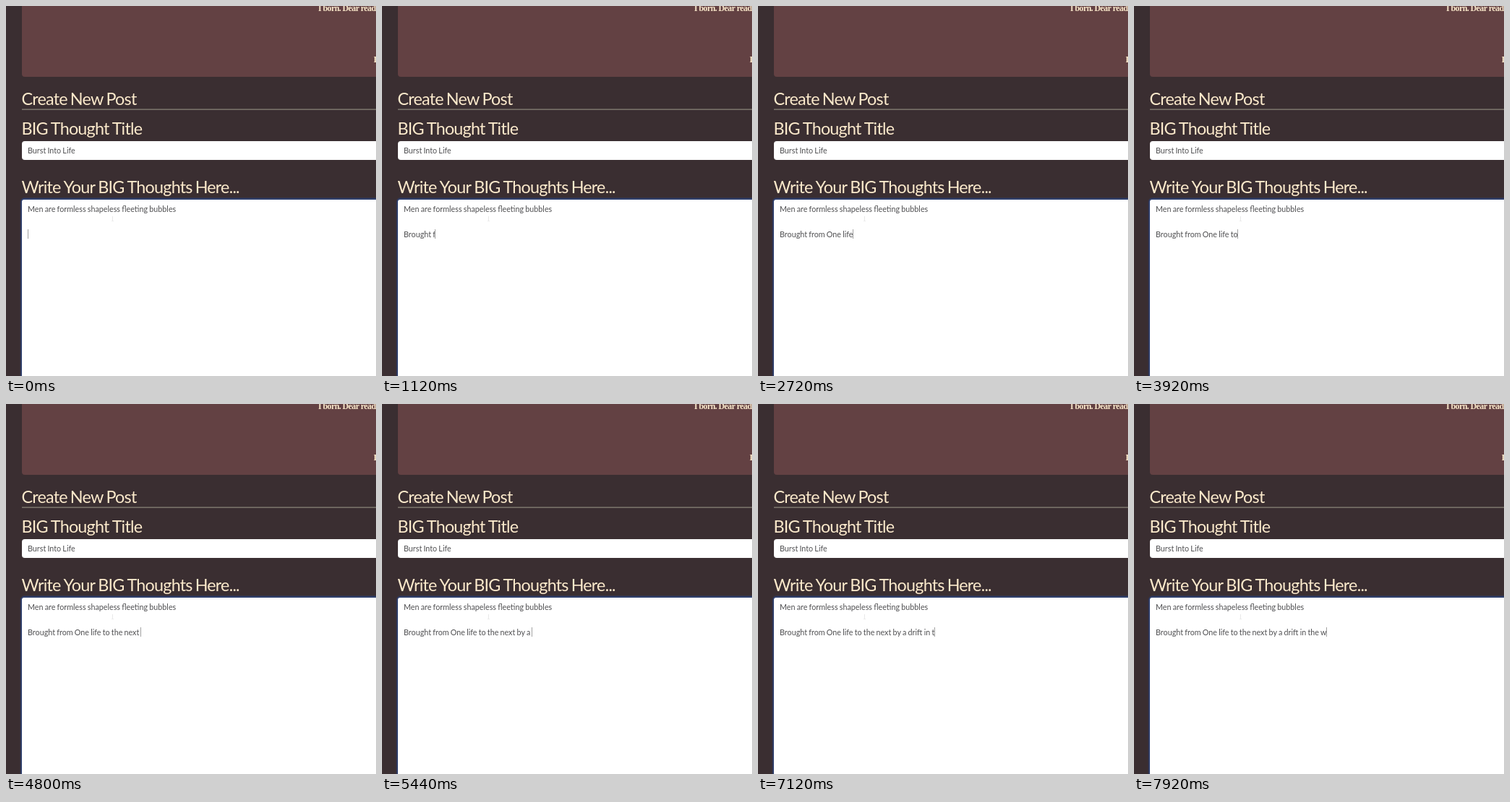
Recreate the animation shown at these times as an HTML page with a canvas. Size 512 by 512 pixels, loop 8000 ms.

```html
<!DOCTYPE html>
<html lang="en">
<head>
<meta charset="utf-8">
<title>Create New Post</title>
<style>
  html, body { margin: 0; width: 100%; height: 100%; overflow: hidden; background: #3a2e31; }
  canvas { display: block; width: 512px; height: 512px; }
</style>
</head>
<body>
<canvas id="stage" width="512" height="512"></canvas>
<script>
const ctx = document.getElementById('stage').getContext('2d');
const LOOP = 8000, TICK = 80;
const CREAM = '#fbe9cb', INK = '#505052';

const HEADING = { font: '23.4px Lato, sans-serif', color: CREAM, letter: '-0.8px', word: '-1.2px' };
const BODY = { font: '10.78px Lato, sans-serif', color: INK, letter: '0px', word: '-0.6px' };
const SERIF = { font: 'bold 12px "Liberation Serif", serif', color: CREAM, letter: '-0.6px', word: '0px' };

const LINE = 'Brought from One life to the next by a drift in the w';
// Typing pace: [tick, characters typed], linear in between.
const PACE = [
  [2, 0], [3, 1], [6, 3], [14, 9], [25, 16], [35, 22],
  [46, 22], [47, 23], [59, 34], [78, 45], [84, 48], [97, 53]
];

function useStyle(style) {
  ctx.font = style.font;
  ctx.fillStyle = style.color;
  ctx.letterSpacing = style.letter;
  ctx.wordSpacing = style.word;
}

function text(str, x, y, style) {
  useStyle(style);
  ctx.fillText(str, x, y);
}

function box(x, y, w, h, radius, color) {
  ctx.fillStyle = color;
  ctx.beginPath();
  ctx.roundRect(x, y, w, h, radius);
  ctx.fill();
}

function rect(x, y, w, h, color) {
  ctx.fillStyle = color;
  ctx.fillRect(x, y, w, h);
}

function drawPage() {
  rect(0, 0, 512, 512, '#3a2e31');
  box(22, -10, 520, 108, 4, '#634143');
  text('I born. Dear reader', 432, 7, SERIF);
  text('I', 508.5, 78, SERIF);

  text('Create New Post', 21.5, 137.3, HEADING);
  rect(22, 142.5, 490, 1.2, '#8d897d');
  text('BIG Thought Title', 21.5, 178, HEADING);
  box(22, 187, 520, 26, 4, '#fff');
  text('Burst Into Life', 30, 204, BODY);

  text('Write Your BIG Thoughts Here...', 21.5, 259.3, HEADING);
  box(19.5, 265, 520, 300, 6, '#343349');
  box(20.5, 266.3, 520, 300, 5, '#2f4170');
  box(22, 268, 520, 300, 3, '#fff');
  text('Men are formless shapeless fleeting bubbles', 30, 285.4, BODY);
}

function drawPointer() {
  rect(147, 291, 1, 7, '#e8e8e8');
  rect(146, 297, 3, 1, '#ececec');
}

function typedCount(tick) {
  const next = PACE.findIndex(([t]) => t > tick);
  if (next === 0) return 0;
  if (next < 0) return LINE.length;
  const [t0, n0] = PACE[next - 1], [t1, n1] = PACE[next];
  return Math.floor(n0 + (n1 - n0) * (tick - t0) / (t1 - t0));
}

function caretVisible(tick) {
  const startBlink = tick >= 1 && tick < 3;
  const pauseBlink = tick >= 39 && tick < 45;
  return !startBlink && !pauseBlink;
}

function drawTyping(tick) {
  const typed = LINE.slice(0, typedCount(tick));
  text(typed, 30, 319.7, BODY);
  if (!caretVisible(tick)) return;
  const x = Math.floor(30 + ctx.measureText(typed).width);
  rect(x, 309, 1, 13, '#a2a2a2');
}

function frame(now) {
  drawPage();
  drawPointer();
  drawTyping(Math.floor((now % LOOP) / TICK));
  requestAnimationFrame(frame);
}
requestAnimationFrame(frame);
</script>
</body>
</html>
```
